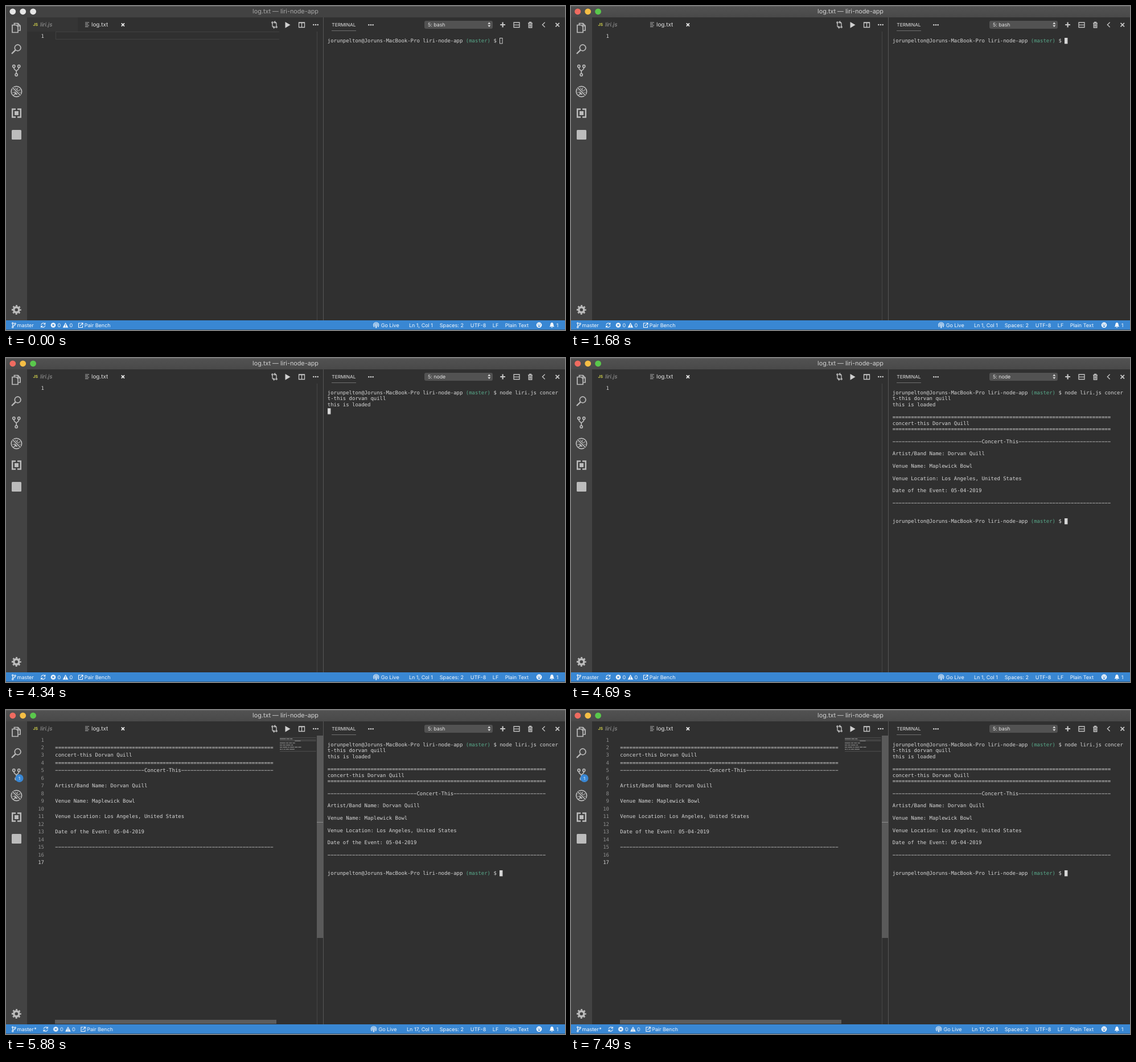
Write an HTML page that moves like this. It is 982 px wide and 570 px high and loops after 7560 ms.

```html
<!DOCTYPE html>
<html lang="en">
<head>
<meta charset="utf-8">
<title>log.txt — liri-node-app</title>
<style>
  html, body { margin: 0; width: 100%; height: 100%; overflow: hidden; background: #303030; }
  svg { display: block; width: 100%; height: 100%; }
  text { font: 9px Inter, "Open Sans", sans-serif; fill: #e4e4e4; text-rendering: geometricPrecision; white-space: pre; }
  .mono text { font: 8.97px "DejaVu Sans Mono", "Liberation Mono", monospace; fill: #d6d6d6; }
  .mono .branch { fill: #58a98a; }
  .mono .num { fill: #8d8d8d; text-anchor: end; }
  .mono .cur { fill: #cfcfcf; }
  .title { font-size: 10.8px; text-anchor: middle; }
  .tab { font-size: 9.9px; }
  .small { font-size: 8.8px; }
  .line { fill: none; stroke: #c6c6c6; stroke-width: 1.3; }
  .side .line { stroke: #bcbcbc; stroke-width: 1.7; }
  .side .thick { stroke-width: 2.4; }
  .side .thin { stroke-width: 1.2; }
  .side { fill: #bcbcbc; }
  .status text { fill: #f4f8fc; }
  .status .line { stroke: #f4f8fc; stroke-width: 1.1; }
  .white { fill: #f4f8fc; }

  /* every change is a hard cut on one 7.56 s clock */
  .t { animation: 7.56s step-end infinite; }
  .blurred { animation-name: blurred; }
  .focused { animation-name: focused; }
  .cmd { animation-name: cmd; }
  .loaded { animation-name: loaded; }
  .output { animation-name: output; }
  .written { animation-name: written; }
  .blank { animation-name: blank; }
  .dirty { animation-name: dirty; }
  .node { animation-name: node; }
  .bash { animation-name: bash; }
  .cursor { animation-name: cursor; }
  .left { animation-name: left; }
  .right { animation-name: right; }
  @keyframes blurred { 0% { opacity: 1 } .92%, 100% { opacity: 0 } }
  @keyframes focused { 0% { opacity: 0 } .92%, 100% { opacity: 1 } }
  @keyframes cmd { 0% { opacity: 0 } 52.77%, 100% { opacity: 1 } }
  @keyframes loaded { 0% { opacity: 0 } 57.4%, 100% { opacity: 1 } }
  @keyframes output { 0% { opacity: 0 } 61.1%, 100% { opacity: 1 } }
  @keyframes written { 0% { opacity: 0 } 62.95%, 100% { opacity: 1 } }
  @keyframes blank { 0% { opacity: 1 } 62.95%, 100% { opacity: 0 } }
  @keyframes dirty { 0% { opacity: 0 } 77.77%, 100% { opacity: 1 } }
  @keyframes node { 0% { opacity: 0 } 56.47% { opacity: 1 } 62.95%, 100% { opacity: 0 } }
  @keyframes bash { 0% { opacity: 1 } 56.47% { opacity: 0 } 62.95%, 100% { opacity: 1 } }
  @keyframes left { 0% { transform: none } 77.77%, 100% { transform: translate(4.4px, 0) } }
  @keyframes right { 0% { transform: none } 62.95%, 100% { transform: translate(-4.3px, 0) } }
  @keyframes cursor {
    0% { opacity: 0; transform: translate(302px, 0) }
    .92%, 17.58%, 35.18%, 49.99% { opacity: 1; transform: translate(302px, 0) }
    11.1%, 27.77%, 41.66% { opacity: 0; transform: translate(302px, 0) }
    52.77% { opacity: 1; transform: translate(102.5px, 10.8px) }
    55.55% { opacity: 1; transform: translate(0, 21.6px) }
    57.4% { opacity: 1; transform: translate(0, 32.4px) }
    61.1%, 77.77%, 93.5%, 100% { opacity: 1; transform: translate(302px, 226px) }
    71.29%, 85.17% { opacity: 0; transform: translate(302px, 226px) }
  }
</style>
</head>
<body>
<svg viewBox="0 0 982 570" preserveAspectRatio="none">
  <defs>
    <linearGradient id="bar" x2="0" y2="1"><stop stop-color="#525252"/><stop offset="1" stop-color="#494949"/></linearGradient>
    <g id="lights"><circle cx="11.8" cy="9.8" r="5.4"/><circle cx="29.7" cy="9.8" r="5.4"/><circle cx="47.6" cy="9.8" r="5.4"/></g>
    <g id="dots"><circle cx="-3.7" r="1.25"/><circle r="1.25"/><circle cx="3.7" r="1.25"/></g>
  </defs>
  <rect width="982" height="570" fill="#303030"/>

  <!-- title bar -->
  <g class="t blurred">
    <rect width="982" height="20" fill="#424242"/>
    <text class="title" x="491" y="13.4" style="fill:#a6a6a6">log.txt — liri-node-app</text>
    <use href="#lights" fill="#e6e6e6"/>
    <rect x="37" y="20" width="89" height="25" fill="#353535"/>
    <path d="M87 45.5H480M87 58.5H480M87.5 45V59" stroke="#414141" fill="none"/>
  </g>
  <g class="t focused">
    <rect width="982" height="20" fill="url(#bar)"/>
    <text class="title" x="491" y="13.4" style="fill:#d2d2d2">log.txt — liri-node-app</text>
    <circle cx="11.8" cy="9.8" r="5.4" fill="#ef6b60"/><circle cx="29.7" cy="9.8" r="5.4" fill="#f5be45"/><circle cx="47.6" cy="9.8" r="5.4" fill="#5ac84c"/>
  </g>
  <path d="M0 .5H982" stroke="#666"/>

  <!-- activity bar -->
  <rect y="20" width="37" height="533" fill="#434343"/>
  <g class="side">
    <path class="line" d="M14.5 33V30.5H21L25 34.5V43H22M21 30.5V35H25M11 33.5H18L21 36.5V46.5H11Z"/>
    <circle class="line" cx="20.6" cy="73.5" r="5.3"/><path class="line thick" d="M16.5 77.7L10 84"/>
    <g class="line"><circle cx="13.8" cy="106" r="2.1"/><circle cx="22.7" cy="106" r="2.1"/><circle cx="18.2" cy="121" r="2.1"/><path d="M13.8 108.5Q14 111.5 18.2 114Q22.5 111.5 22.7 108.5M18.2 114V118.5"/></g>
    <circle class="line" cx="18.4" cy="150.5" r="9.2"/>
    <ellipse cx="18.4" cy="151.5" rx="3.4" ry="4.6"/>
    <path class="line thin" d="M12 147L15 149M11.5 152H15M13 157L16 154.5M25 147L22 149M25.5 152H22M24 157L21 154.5M16 144.5L18.4 147L21 144.5"/>
    <path d="M12 144L25 157" stroke="#434343" stroke-width="4"/><path class="line" d="M12 144L25 157"/>
    <path class="line thick" d="M17 181.5H11.2V195.5H17M20 181.5H25.8V195.5H20"/>
    <rect x="15" y="185" width="7" height="7"/>
    <rect x="10" y="218" width="17" height="17" rx="1.5"/>
    <circle cx="18.3" cy="534.5" r="4.6" fill="none" stroke="#bcbcbc" stroke-width="3.6"/>
    <circle cx="18.3" cy="534.5" r="7.2" fill="none" stroke="#bcbcbc" stroke-width="2.4" stroke-dasharray="2.83" stroke-dashoffset="1.4"/>
  </g>
  <g class="t dirty">
    <circle cx="23.5" cy="120" r="7" fill="#3987d4"/>
    <text x="23.4" y="122.7" text-anchor="middle" style="font-size:7.4px;fill:#fff">1</text>
  </g>

  <!-- tabs and editor actions -->
  <text x="47.5" y="35.3" style="font-size:7px;font-weight:700;fill:#cbcb4a">JS</text>
  <text class="tab" x="60" y="36.3" style="font-style:italic;fill:#9c9c9c">liri.js</text>
  <path class="line" d="M139 29H146M139 31.5H144M139 34H146M139 36.5H144.5" style="stroke:#b0b0b0;stroke-width:1"/>
  <text class="tab" x="150" y="36.3">log.txt</text>
  <path class="line" d="M202.8 30.4L208 35.6M208 30.4L202.8 35.6" style="stroke:#f0f0f0;stroke-width:1.7"/>
  <g class="line">
    <path d="M468 30V35Q468 37.5 471 37.5M470 35.5L472 37.5L470 39.5M475 36V31Q475 28.5 472 28.5M473 26.5L471 28.5L473 30.5"/>
    <circle cx="468" cy="29" r="1.2"/><circle cx="475" cy="37" r="1.2"/>
    <path d="M514.5 29H524.5V37.5H514.5ZM519.5 29V37.5M514 29.5H525"/>
  </g>
  <path d="M490.5 28L499.5 33.3L490.5 38.8Z" fill="#d0d0d0"/>
  <g fill="#d4d4d4"><use href="#dots" x="544" y="33"/><use href="#dots" x="641" y="33.2"/></g>
  <path d="M546.5 45V553" stroke="#454545"/>
  <path d="M557.5 20V553" stroke="#565656"/>

  <!-- terminal header -->
  <text x="572.3" y="36" style="font-size:8.3px">TERMINAL</text>
  <path d="M572 43.5H615" stroke="#707070"/>
  <rect x="735" y="26" width="120" height="14" rx="3" fill="#525252"/>
  <text class="small t bash" x="741" y="36.3">5: bash</text>
  <text class="small t node" x="741" y="36.3">5: node</text>
  <path d="M846.3 31.8L848.8 28.5L851.3 31.8ZM846.3 33.8L848.8 37.1L851.3 33.8Z" fill="#e0e0e0"/>
  <g class="line">
    <path d="M868.2 33H877M872.6 28.6V37.4" style="stroke-width:2.2"/>
    <path d="M892 29H902V37.5H892ZM892 33.3H902"/>
    <path d="M917 30.2H925M919.5 30V28.5H922.5V30M918.3 30.5V38H923.8V30.5M920.2 31.5V36.5M921.9 31.5V36.5"/>
    <path d="M946.7 28.8L942.3 33L946.7 37.2"/>
    <path d="M965.5 29.8L972 36.3M972 29.8L965.5 36.3" style="stroke-width:1.8"/>
  </g>

  <!-- terminal -->
  <g class="mono" id="term">
    <rect class="t blurred" x="867.5" y="56.5" width="4.5" height="9.5" fill="none" stroke="#cdcdcd"/>
    <rect class="t cursor" x="565" y="56" width="5.4" height="10.5" fill="#d6d6d6"/>
    <g class="t cmd" id="cmd"></g>
    <g class="t loaded" id="loaded"></g>
    <g class="t output" id="output"></g>
  </g>

  <!-- editor -->
  <g class="mono">
    <text class="num cur t blank" x="67" y="55.5">1</text>
    <g class="t written">
      <g id="editor"></g>
      <g id="map" fill="#c8c8c8"></g>
      <rect x="546" y="45" width="11" height="356" fill="#5a5a5a"/>
      <path d="M546 197.5H557" stroke="#8c8c8c"/>
      <rect x="86" y="545" width="389" height="7" fill="#5c5c5c"/>
    </g>
  </g>

  <!-- status bar -->
  <rect y="553" width="982" height="16.5" fill="#3987d3"/>
  <g class="status">
    <g class="line"><circle cx="11.8" cy="558.3" r="1.2"/><circle cx="11.8" cy="565" r="1.2"/><circle cx="16" cy="559" r="1.2"/><path d="M11.8 559.5V563.8M16 560.2Q16 562.5 11.8 563"/></g>
    <text x="19.5" y="564.8">master</text>
    <text class="t dirty" x="49.2" y="564.8">*</text>
    <g class="t left">
      <path class="line" d="M61.8 561A3.6 3.6 0 0 1 68.4 559.5M68.8 562A3.6 3.6 0 0 1 62.2 563.6M68.8 557.3V560H66M61.7 565.7V563H64.5"/>
      <circle class="white" cx="83" cy="561.5" r="4.3"/><path d="M81.3 559.8L84.7 563.2M84.7 559.8L81.3 563.2" stroke="#3987d3" stroke-width="1.2"/>
      <text x="90.5" y="564.8">0</text>
      <path class="white" d="M104.5 557L109.3 565.7H99.7Z"/><path d="M104.5 559.7V562.7M104.5 563.5V564.7" stroke="#3987d3" stroke-width="1.1"/>
      <text x="111.5" y="564.8">0</text>
      <path class="line" d="M131 558H127.5V565.5H134.5V562M130 562.8L134.5 558.3M131.8 557.7H135V561"/>
      <text x="137.8" y="564.8">Pair Bench</text>
    </g>
    <g class="t right">
      <path class="line" d="M647.2 564.8A4.6 4.6 0 1 1 653.2 564.8M648.6 563.2A2.5 2.5 0 1 1 651.8 563.2"/>
      <circle class="white" cx="650.2" cy="561.3" r="1.1"/><rect class="white" x="649.3" y="562.5" width="1.9" height="4"/>
      <text x="658.7" y="564.8">Go Live</text>
    </g>
    <text class="t blank" x="750" y="564.8" text-anchor="end">Ln 1, Col 1</text>
    <text class="t written" x="750" y="564.8" text-anchor="end">Ln 17, Col 1</text>
    <text x="761.8" y="564.8">Spaces: 2</text>
    <text x="815.8" y="564.8">UTF-8</text>
    <text x="854.8" y="564.8">LF</text>
    <text x="876.7" y="564.8">Plain Text</text>
    <circle class="white" cx="936.5" cy="561.3" r="4.8"/>
    <g fill="#3987d3"><path d="M933.7 562.3Q936.5 566.5 939.3 562.3Z"/><circle cx="934.8" cy="559.8" r=".9"/><circle cx="938.2" cy="559.8" r=".9"/></g>
    <path class="white" d="M954.5 564.3Q956.3 563 956.3 560Q956.5 557.3 959 556.8Q961.5 557.3 961.7 560Q961.7 563 963.5 564.3ZM957.5 565H960.5Q959 567.3 957.5 565Z"/>
    <text x="966.8" y="564.8">1</text>
  </g>
</svg>
<script>
  const $ = id => document.getElementById(id);
  const rule = (mark, n) => mark.repeat(n);
  const prompt = 'jorunpelton@Joruns-MacBook-Pro liri-node-app <tspan class="branch">(master)</tspan> $ ';

  function add(parent, tag, attrs, html = '') {
    const el = document.createElementNS('http://www.w3.org/2000/svg', tag);
    for (const key in attrs) el.setAttribute(key, attrs[key]);
    el.innerHTML = html;
    parent.appendChild(el);
  }
  const termLine = (parent, row, html, col = 0) =>
    add(parent, 'text', { x: 564.8 + col * 5.4, y: 63.6 + row * 10.78 }, html);

  const banner = [rule('=', 71), 'concert-this Dorvan Quill', rule('=', 71)];
  const heading = rule('−', 29) + 'Concert-This' + rule('−', 30);
  const details = [
    '', 'Artist/Band Name: Dorvan Quill',
    '', 'Venue Name: Maplewick Bowl',
    '', 'Venue Location: Los Angeles, United States',
    '', 'Date of the Event: 05-04-2019',
    '', rule('−', 71)
  ];

  termLine($('term'), 0, prompt);
  termLine($('cmd'), 0, 'node liri.js concer', 56);
  termLine($('cmd'), 1, 't-this dorvan quill');
  termLine($('loaded'), 2, 'this is loaded');
  [...banner, '', heading, ...details, '', '', prompt].forEach((s, i) => {
    if (s) termLine($('output'), i + 4, s);
  });

  ['', ...banner, heading, ...details, '', ''].forEach((s, i) => {
    const y = 55.5 + i * 13.47;
    add($('editor'), 'text', { x: 67, y, class: i === 16 ? 'num cur' : 'num' }, i + 1);
    if (s) add($('editor'), 'text', { x: 86.3, y }, s);
    for (const m of s.matchAll(/[=−]+|[^\s=−]+/g)) {
      add($('map'), 'rect', {
        x: 481 + m.index * 0.9, y: 46.5 + i * 1.83,
        width: m[0].length * 0.9 - 0.2, height: 1.1,
        opacity: /[=−]/.test(m[0]) ? 0.2 : 0.7
      });
    }
  });
</script>
</body>
</html>
```
